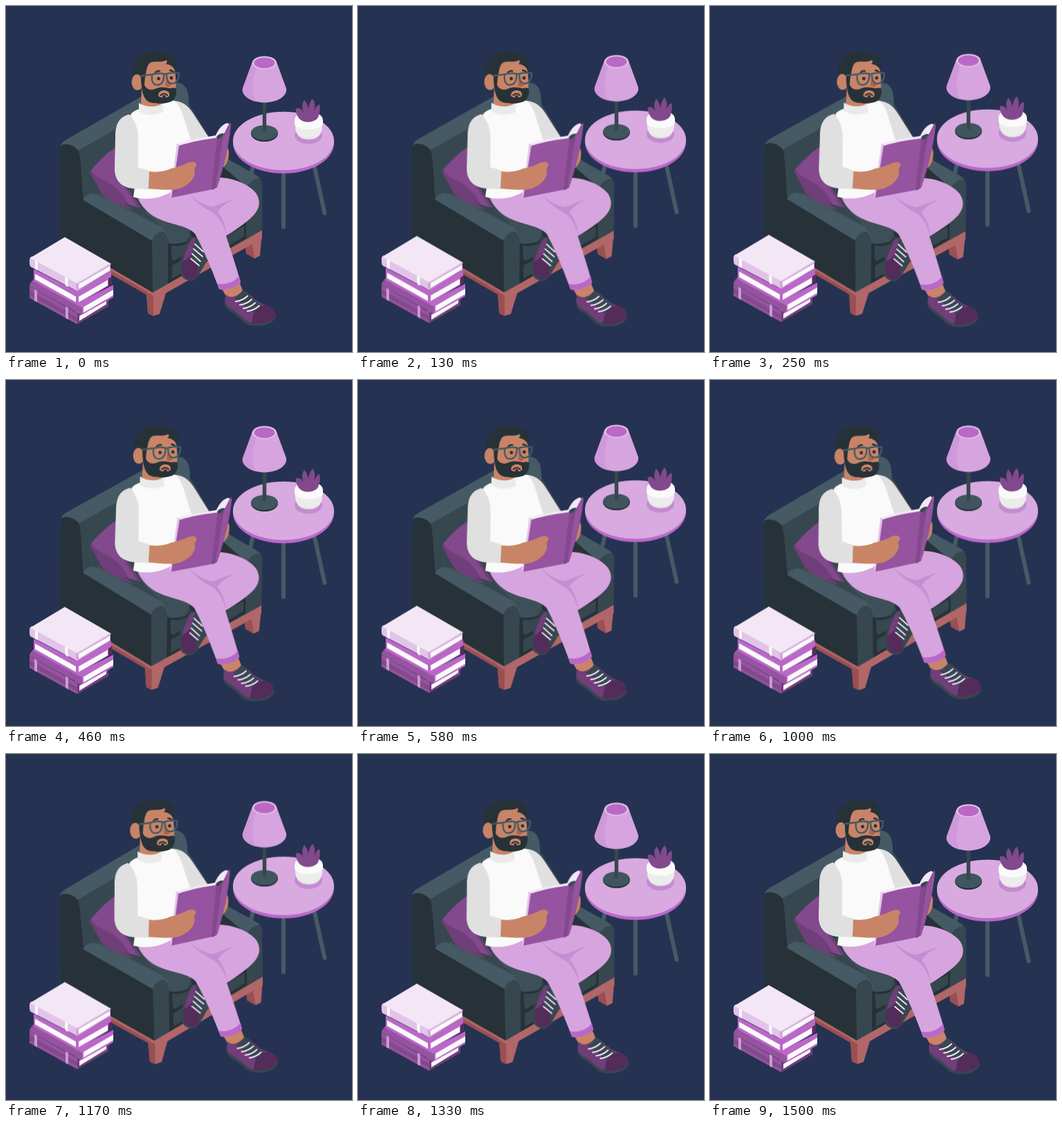
These frames come from a looping animation (500 px wide and 500 px high, 1.54 s). An HTML page:

```html
<!DOCTYPE html>
<html lang="en">
<head>
<meta charset="utf-8">
<title>Reading in an armchair</title>
<style>
  html, body { margin: 0; width: 100%; height: 100%; overflow: hidden; background: #253252; }
  svg { display: block; width: 100%; height: 100%; }

  /* 1500 ms of motion in 36 steps, then a short hold */
  .float { animation: float 1540ms -4ms infinite; }
  .rock { transform-origin: 234px 263px; animation: rock 1540ms -4ms infinite; }
  @keyframes float {
    0% { transform: translateY(0); animation-timing-function: steps(18); }
    48.7013% { transform: translateY(-10px); animation-timing-function: steps(18); }
    97.4026%, 100% { transform: translateY(0); }
  }
  @keyframes rock {
    0% { transform: rotate(0deg); animation-timing-function: steps(9); }
    24.3506% { transform: rotate(1deg); animation-timing-function: steps(18); }
    73.0519% { transform: rotate(-1deg); animation-timing-function: steps(9); }
    97.4026%, 100% { transform: rotate(0deg); }
  }

  .ink { fill: #263238; }
  .slate { fill: #37474f; }
  .steel { fill: #455a64; }
  .wood { fill: #b16668; }
  .wood2 { fill: #9a4f52; }
  .skin { fill: #c98467; }
  .white { fill: #fafafa; }
  .grey { fill: #e0e0e0; }
  .pale { fill: #f3e7f6; }
  .mist { fill: #e3c3e9; }
  .lilac { fill: #d6a4de; }
  .violet { fill: #ba68c8; }
  .plum { fill: #9553a0; }
  .grape { fill: #82498c; }
  .wine { fill: #703e78; }
  .night { fill: #532c5a; }
  .line { fill: none; stroke-linecap: round; stroke-linejoin: round; }
</style>
</head>
<body>
<svg viewBox="0 0 500 500">

  <!-- side table -->
  <g class="float">
    <g transform="translate(0 1)">
      <g class="line" stroke="#455a64" stroke-width="6">
        <path d="M401 235V318.500M445 228L460.500 298.500M358 226L349 264"/>
      </g>
      <path class="violet" d="M328 194V199C330 223 362 241 401 241S472 223 474 199V194Z"/>
      <ellipse cx="401" cy="194" rx="73" ry="42.300" fill="#d8aae0"/>

      <ellipse class="ink" cx="373.500" cy="183.500" rx="19.500" ry="11.500"/>
      <ellipse cx="373.500" cy="182" rx="19.300" ry="10.800" fill="#41555f"/>
      <path class="line" d="M373.500 130V178" stroke="#37474f" stroke-width="5.500"/>
      <path class="lilac" d="M356 80L342 118C340 129 355 138.500 373.500 138.500S407 129 405 118L391 80Z"/>
      <path d="M356 80L342 118C340 126 349 134 361 137C353 124 357 100 362 87Z" fill="#cf98da"/>
      <ellipse class="mist" cx="373.500" cy="81" rx="17.500" ry="9.500"/>
      <ellipse class="violet" cx="373.500" cy="81.300" rx="15" ry="7.800"/>

      <ellipse cx="437" cy="186" rx="20" ry="12.500" fill="#c48bd0"/>
      <path class="grey" d="M418 170C418 185 424 192 437.500 192S457 185 457 170Z"/>
      <path d="M418 170C417 184 424 190 437.500 190S458 184 457 170Z" fill="#ececec"/>
      <path class="white" d="M417 164C417 148 458 148 458 164V169C457 180 418 180 417 169Z"/>
      <path class="grape" d="M419 147C424 145 428 149 430 153C427 145 428 139 431 135C435 139 437 145 437 150C437 143 440 136 443 133C447 138 447 145 445 151C447 146 450 142 453 141C455 147 453 154 451 160C446 168 430 169 424 162C420 157 418 151 419 147Z"/>
    </g>
  </g>

  <g class="rock">
    <!-- chair: back and seat -->
    <path class="slate" d="M100 206L190 150L264 140L312 219L366 250V332L234 405L112 340Z"/>
    <path class="steel" d="M79 204C79 199 82 196 87 193L190 134C215 121 236 112 248 111C258 111 264 121 264 142L200 155L104 209Z"/>
    <path class="steel" d="M236 114C246 109 256 111 261 120C264 127 264 134 264 144L245 146Z"/>
    <path class="ink" d="M79 204C80 196 100 200 105 210C109 224 109 252 112 279L212 337V414L79 338Z"/>
    <path class="slate" d="M105 209L165 174V212L122 240L130 268L112 279C109 250 109 224 105 209Z"/>

    <!-- pillow -->
    <path class="wine" d="M121 240C130 228 150 208 160 204L170 255L195 291L180 294C162 287 142 278 137 269C132 259 126 250 121 240Z"/>
    <path class="grape" d="M123 237C134 225 150 208 160 204L167 255L190 291L180 293C174 278 164 265 151 257C140 251 128 247 123 237Z"/>

    <!-- chair: right arm and front -->
    <path class="ink" d="M300 222L313 221L349 250L348 300L300 260Z"/>
    <path class="steel" d="M306 226L315 218L361 244C369 249 370 254 370 263L348 262Z"/>
    <path class="slate" d="M346 270C347 258 357 249 366 249C370 252 370 258 370 264V325L346 338Z"/>
    <path class="ink" d="M234 340L347 287V336L234 402Z"/>
    <path class="slate" d="M239 346C255 350 266 340 280 332L344 297V313L243 368C239 369 239 362 239 346ZM240 375L344 318V333L240 394Z"/>
    <path class="slate" d="M170 285L262 312L268 333C258 343 246 345 237 343L222 320Z"/>
    <path class="steel" d="M200 296L268 316L262 340C252 344 242 344 234 343L234 328Z" opacity=".5"/>

    <!-- chair: left arm -->
    <path class="steel" d="M111 280C116 273 123 269 130 272L226 322C233 326 235 331 235 338L212 340Z"/>
    <path class="slate" d="M211 342C211 332 220 326 227 326C232 328 234 333 234 340V402L212 414Z"/>
    <path class="line" d="M133 272L226 321" stroke="#566b75" stroke-width="1"/>

    <!-- chair: base -->
    <path class="wood" d="M345 342L370 327L367 361L359 365L355 343Z"/>
    <path class="wood2" d="M345 342L355 342L359 365L347 358Z"/>
    <path class="wood" d="M140 372L212 414L370 324V336L231 415L222 445L213 448L205 444L203 417L140 381Z"/>
    <path class="wood2" d="M203 413L213 419V448L205 444ZM140 376L203 412V417L140 381Z"/>

    <!-- far shoe -->
    <path class="slate" d="M268 334C258 346 251 368 251 380C251 393 262 399 271 397L277 391L292 366L278 334Z"/>
    <path class="night" d="M269 336C261 346 255 365 254 379C255 391 264 397 272 394C278 390 277 384 277 377L268 364Z"/>
    <path class="wine" d="M270 335C262 346 257 360 256 369C262 366 266 362 269 357L274 336Z"/>
    <path class="line" d="M273 344L285 355M271 351L284 362M269 358L281 369M267 365L279 375" stroke="#f1e1f4" stroke-width="1.800"/>

    <!-- legs -->
    <path class="skin" d="M312 409L338 401L344 416L330 427L319 421Z"/>
    <path class="lilac" d="M190 276L200 262L240 256L298 248C326 246 350 257 361 270C371 285 364 298 352 308C340 318 328 326 318 332C326 356 333 378 339 399C332 408 318 412 308 409C296 376 282 345 273 329C262 316 232 316 212 303C202 296 194 287 190 276Z"/>
    <path d="M265 272C277 283 287 288 297 290C307 289 319 280 330 280C318 284 310 291 306 298C314 308 318 320 319 332C315 316 308 306 301 300C290 294 275 285 265 272Z" fill="#c78dd2"/>
    <path class="violet" d="M305 401C316 404 330 399 337 390L339 399C333 408 318 412 308 409Z"/>

    <!-- near shoe -->
    <path class="slate" d="M317 424C314 432 318 437 325 442C337 448 343 460 354 462C370 464 386 460 390 449L388 442Z"/>
    <path class="wine" d="M318 417C325 424 335 419 342 411C354 414 358 428 378 433C386 436 390 441 389 448C383 458 365 461 354 458C343 454 336 443 326 438C316 433 315 425 318 417Z"/>
    <path class="night" d="M360 440C366 433 372 432 379 433C386 436 390 441 389 448C383 458 365 461 354 458C358 453 355 446 360 440Z"/>
    <path class="slate" d="M330 422C335 420 339 415 342 411C353 415 356 426 370 432L357 443Z"/>
    <path class="line" d="M332 427C339 426 345 423 349 419M338 432C345 431 351 428 355 424M343 437C350 436 356 433 360 429M349 441C356 440 362 437 366 433" stroke="#f1e1f4" stroke-width="2"/>

    <!-- torso -->
    <path class="grey" d="M243 137C258 138 266 147 273 159L293 190L262 202L250 176Z"/>
    <path class="white" d="M192 149C181 153 174 158 184 176L189 240L184 276C204 282 225 277 240 268L268 195C259 172 256 150 245 138C239 135 232 136 226 141Z"/>
    <path class="grey" d="M178 156.500C162 161 158 172 158 190L157 235C157 255 170 263 186 264L207 265V238L191 233V190C191 176 186 165 178 156.500Z"/>

    <!-- open book -->
    <path class="skin" d="M311 205C319 199 323 206 322 214C322 224 318 231 311 235Z"/>
    <path class="pale" d="M246 199C266 193 284 190 303 187C307 178 312 171 320 169L324 172L312 194L246 206Z"/>
    <path class="wine" d="M309 192C316 187 319 175 324 168L325 172C322 204 314 234 305 262L298 266Z"/>
    <path class="plum" d="M313 190C318 184 320 175 324 168L325 172C322 204 314 234 305 262L302 263Z"/>
    <path class="mist" d="M247 199L252 201L241 276L237 276Z"/>
    <path class="plum" d="M250 202C268 196 290 192 310 190C308 217 303 244 298 265L239 277Z"/>
    <path class="grape" d="M305 191L311 190C311 216 306 242 301 264L297 265Z"/>
    <path class="slate" d="M304 190C306 185 311 184 315 184C314 188 310 192 306 192Z"/>

    <!-- near hand -->
    <path class="skin" d="M207 239C220 241 232 238 238 235C248 233 258 229 264 226C270 224 276 226 275 230C274 233 271 235 273 239C273 251 262 260 250 264C238 267 220 265 206 264Z"/>

    <!-- head -->
    <path class="skin" d="M196 118L195 142C204 150 221 149 228 141V132Z"/>
    <path d="M192 140C202 147 219 147 227 140L227 153C216 159 201 159 192 152Z" fill="#ebebeb"/>
    <ellipse class="skin" cx="190" cy="110" rx="8.500" ry="11.500"/>
    <path class="skin" d="M196 92C205 75 232 72 240 84C246 92 246 112 245 124C238 138 212 140 200 128Z"/>
    <path class="ink" d="M183 99C180 79 195 66 216 66C234 65 247 72 246 83C246 87 245 90 244 92C241 87 236 84 231 84C233 82 233 80 232 78C224 83 213 78 207 83C202 90 203 97 201 103L196 113L195 103C192 97 186 98 183 99Z"/>
    <path class="ink" d="M195 101L201 102L200 114C203 121 209 122 215 120C224 116 232 118 237 119C241 118 244 118 246 119C247 127 245 134 239 138C229 142 211 142 204 137C197 131 195 116 195 101Z"/>
    <path class="skin" d="M220 130C220 124 224 122 228.500 122S237 124 236 130L233 132H223Z"/>
    <path class="line" d="M223.500 129C226 126 231 126 233 129" stroke="#263238" stroke-width="2.200"/>
    <path class="ink" d="M226.500 129H230.500V133H226.500Z"/>
    <path d="M231 104L239 114C237 118 232 117 230 115Z" fill="#b4624b"/>
    <circle class="ink" cx="220.500" cy="105" r="2.400"/>
    <circle class="ink" cx="239" cy="104" r="2.400"/>
    <path class="line" d="M215.500 97C217 94 219 93.500 222 94M237 93C239 93 241 94 243 96" stroke="#263238" stroke-width="2.300"/>
    <g class="line" stroke="#455a64" stroke-width="2.400">
      <path d="M195 101L210 99M211 99C217 97 223 97 228 98C229 105 227 113 220 114C212 115 210 108 211 99ZM232 98C238 96 244 96 250 97C250 104 248 111 241 112C234 113 232 106 232 98ZM228 100C229 98 231 98 232 100"/>
    </g>
  </g>

  <!-- pile of books -->
  <g class="float">
    <path class="plum" d="M34 405L103 444V460L34 422Z"/>
    <path class="grape" d="M34 411L103 450V456L34 418Z"/>
    <path d="M41 409L45 411V428L41 426ZM86 434L90 436V453L86 451Z" fill="#c99bd2"/>
    <path class="wine" d="M103 444L148 420V434L103 460Z"/>
    <path class="white" d="M106 448L145 425V431L106 455Z"/>

    <path class="plum" d="M41 394L108 430V446L34 405C34 401 37 398 41 394Z"/>
    <path class="violet" d="M100 431L155 403V421L110 446L100 442Z"/>
    <path class="white" d="M112 435L155 410V418L112 443Z"/>
    <path class="plum" d="M100 431L110 436V446L100 441Z"/>

    <path class="violet" d="M40 380L102 412L152 383V402L102 432L40 398Z"/>
    <path class="white" d="M42 387L101 420V428L42 395ZM105 420L147 396V404L105 428Z"/>
    <path class="night" d="M148 394L153 391V402L148 405Z"/>

    <path class="lilac" d="M99 398L151 372V383L103 412L99 410Z"/>
    <path class="white" d="M105 402L150 376V382L105 409Z"/>
    <path class="mist" d="M34 367C34 364 36 362 39 362L103 397C100 401 100 407 103 412L36 377C34 376 34 372 34 367Z"/>
    <path class="white" d="M42 365L46 366V382L42 380ZM86 389L90 391C89 396 89 401 90 406L86 404C85 399 85 394 86 389Z"/>
    <path class="pale" d="M85 334L151 372L103 401L35 364Z"/>
    <path class="line" d="M103 401L151 372.500" stroke="#e3c3e9" stroke-width="1.500"/>
  </g>
</svg>
</body>
</html>
```
